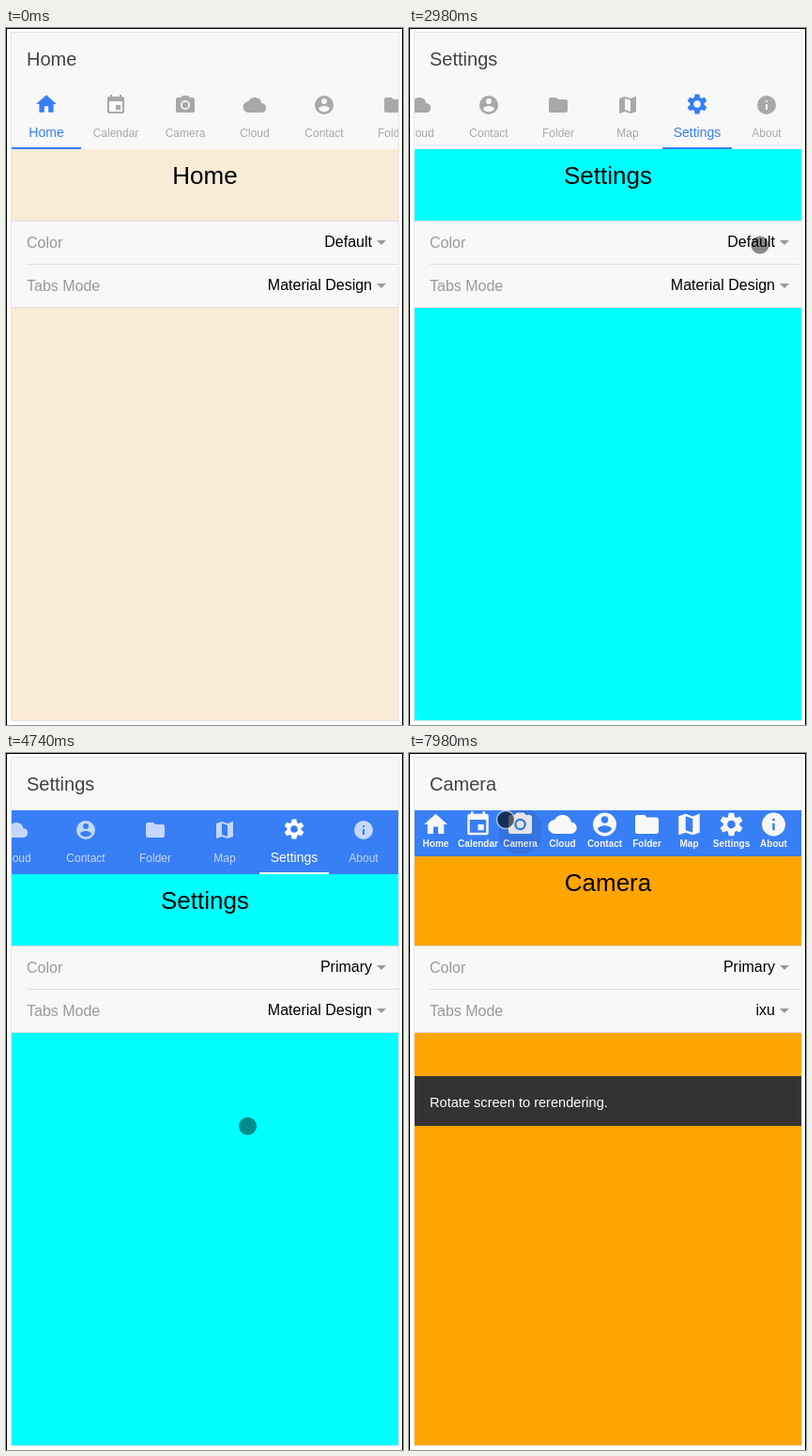
Write an HTML page with a canvas that moves like this. It is 423 px wide and 742 px high and loops after 8 s.

```html
<!DOCTYPE html>
<html lang="en">
<head>
<meta charset="utf-8">
<title>Tabs demo</title>
<style>
  html, body { margin: 0; width: 100%; height: 100%; overflow: hidden; background: #fff; }
  canvas { display: block; }
</style>
</head>
<body>
<canvas id="stage" width="423" height="742"></canvas>
<script>
const ctx = document.getElementById('stage').getContext('2d');
const LOOP = 8000, BLUE = '#387ef5', PAPER = '#f8f8f8', LINE = '#dedede';
const LEFT = 6, TOP = 5, WIDTH = 412, BOTTOM = 737, TAB = 74, COMPACT_TAB = 45;

// Icons on a 24 unit grid, filled even-odd
const disc = (x, y, r) =>
  `M${x - r} ${y}a${r} ${r} 0 1 0 ${2 * r} 0a${r} ${r} 0 1 0 ${-2 * r} 0z`;
const gear = () => {
  const points = [];
  for (let tooth = 0; tooth < 6; tooth++)
    for (const [offset, r] of [[-24, 7], [-13, 10], [13, 10], [24, 7]]) {
      const a = (tooth * 60 - 90 + offset) * Math.PI / 180;
      points.push(`${12 + r * Math.cos(a)} ${12 + r * Math.sin(a)}`);
    }
  return `M${points.join('L')}z` + disc(12, 12, 3.5);
};

const tabs = [
  ['Home', '#faebd7', 'M10 20v-6h4v6h5v-8h3L12 3 2 12h3v8z'],
  ['Calendar', '#7fffd4', 'M5 3h1V1h2v2h8V1h2v2h1a2 2 0 0 1 2 2v14a2 2 0 0 1-2 2H5a2 2 0 0 1-2-2V5a2 2 0 0 1 2-2zM5 8v11h14V8zM12 12h5v5h-5z'],
  ['Camera', '#ffa500', 'M9 2L7 4H4a2 2 0 0 0-2 2v12a2 2 0 0 0 2 2h16a2 2 0 0 0 2-2V6a2 2 0 0 0-2-2h-3L15 2z' + disc(12, 12, 5) + disc(12, 12, 3.2)],
  ['Cloud', '#87ceeb', 'M19.4 10A7.5 7.5 0 0 0 5.4 8 6 6 0 0 0 6 20h13a5 5 0 0 0 .4-10z'],
  ['Contact', '#9acd32', disc(12, 12, 10) + disc(12, 8, 3) + 'M12 19.2a7.2 7.2 0 0 1-6-3.2c0-2 4-3.1 6-3.1s6 1.1 6 3.1a7.2 7.2 0 0 1-6 3.2z'],
  ['Folder', '#808080', 'M10 4H4a2 2 0 0 0-2 2v12a2 2 0 0 0 2 2h16a2 2 0 0 0 2-2V8a2 2 0 0 0-2-2h-8z'],
  ['Map', '#008080', 'M20.5 3L15 5.1 9 3 3 5v16l6-2.1 6 2.1 6-2V3zM15 19l-6-2.1V5l6 2.1z'],
  ['Settings', '#00ffff', gear()],
  ['About', '#d3d3d3', disc(12, 12, 10) + 'M11 11h2v6h-2zM11 7h2v2h-2z']
].map(([name, color, path]) => ({ name, color, icon: new Path2D(path) }));

// [time, tab index]
const selections = [[-1000, 0], [160, 2], [740, 4], [1810, 6], [2400, 7], [5400, 5], [7640, 2]];
const COLOR_SET = 4300, MODE_SET = 7110;
const taps = [160, 740, 1810, 2400, 3160, 3640, 4290, 5400, 5840, 6520, 7090, 7920];

const dialogs = [
  { title: 'Color', top: 188, listHeight: 239, open: 3180, close: COLOR_SET, pick: 3650,
    options: ['Default', 'Primary', 'Secondary', 'Danger', 'Dark', 'Light'] },
  { title: 'Tabs Mode', top: 241, listHeight: 133, open: 5851, close: MODE_SET, pick: 6530,
    options: ['Material Design', 'ixu', 'Gardens Tablet'] }
];

// [time, x, y]
const pointer = [
  [100, 215, 170], [155, 192, 98], [620, 192, 98], [735, 340, 100], [1280, 340, 100],
  [1700, 347, 108], [2080, 347, 108], [2350, 306, 104], [2560, 306, 104], [2760, 345, 140],
  [2980, 374, 231], [3260, 374, 231], [3620, 150, 325], [3820, 150, 325], [4120, 279, 478],
  [4240, 300, 525], [4480, 300, 525], [5340, 160, 104], [5480, 160, 104], [5800, 308, 273],
  [5960, 308, 273], [6240, 210, 350], [6500, 125, 378], [6640, 125, 378], [6840, 307, 465],
  [6980, 305, 472], [7240, 305, 472], [7420, 242, 267], [7450, 232, 237], [7600, 103, 71]
];

const clamp = (v, lo = 0, hi = 1) => Math.min(hi, Math.max(lo, v));
const mix = (a, b, p) => a + (b - a) * p;
const easeOut = p => 1 - (1 - clamp(p)) ** 3;
const easeInOut = p => (p = clamp(p)) < .5 ? 2 * p * p : 1 - 2 * (1 - p) ** 2;
const scrollFor = index => clamp((index + .5) * TAB - WIDTH / 2, 0, tabs.length * TAB - WIDTH);

function rect(x, y, w, h, color) {
  ctx.fillStyle = color;
  ctx.fillRect(x, y, w, h);
}

function circle(x, y, r, fill, stroke, lineWidth = 2) {
  ctx.beginPath();
  ctx.arc(x, y, r, 0, 7);
  if (fill) { ctx.fillStyle = fill; ctx.fill(); }
  if (stroke) { ctx.strokeStyle = stroke; ctx.lineWidth = lineWidth; ctx.stroke(); }
}

function text(str, x, y, size, color, align = 'left', weight = 'normal') {
  ctx.font = `${weight} ${size}px "Liberation Sans", Arial, sans-serif`;
  ctx.textAlign = align;
  ctx.fillStyle = color;
  ctx.fillText(str, x, y);
}

function clipped(x, y, w, h, draw) {
  ctx.save();
  ctx.beginPath();
  ctx.rect(x, y, w, h);
  ctx.clip();
  draw();
  ctx.restore();
}

function drawIcon(icon, x, y, scale, color) {
  ctx.save();
  ctx.translate(x, y);
  ctx.scale(scale, scale);
  ctx.translate(-12, -12);
  ctx.fillStyle = color;
  ctx.fill(icon, 'evenodd');
  ctx.restore();
}

const lastTap = t => taps.filter(time => time <= t).pop() ?? -1000;

function ripple(x, y, age) {
  if (age < 200) circle(x, y, 4 + age * .34, `rgba(0,0,0,${.12 * (1 - age / 200)})`);
}

function drawWideTabs(t, current, previous, since, primary) {
  const scroll = mix(scrollFor(previous), scrollFor(current), easeOut(since / 150));
  const idle = primary ? 'rgba(255,255,255,.7)' : '#a8a8a8';
  const active = primary ? '#fff' : BLUE;
  clipped(LEFT, 61, WIDTH, 68, () => {
    tabs.forEach(({ name, icon }, i) => {
      const x = LEFT + (i + .5) * TAB - scroll, on = i === current;
      drawIcon(icon, x, on ? 81 : 82, on ? 1.08 : 1, on ? active : idle);
      text(name, x, 116, on ? 14 : 12, on ? active : idle, 'center');
    });
    const line = mix(previous, current, easeOut(since / 300)) * TAB;
    rect(LEFT + line - scroll, 127, TAB, 2, active);

    const tabX = LEFT + current * TAB - scroll;
    clipped(tabX, 61, TAB, 68, () => ripple(tabX + TAB / 2, 95, since));

    if (scrollFor(current) !== scrollFor(previous)) {
      const shade = `rgba(0,0,0,${.25 * clamp((550 - since) / 200)})`;
      rect(8 + scroll * .595, 121, 249, 6, shade);
      rect(410, 61, 6, 54, shade);
    }
  });
}

function drawCompactTabs(t, current) {
  tabs.forEach(({ name, icon }, i) => {
    const x = 28.5 + i * COMPACT_TAB;
    drawIcon(icon, x, 76, 1.25, PAPER);
    text(name, x, 100, 10, PAPER, 'center', 'bold');
  });
  const x = LEFT + current * COMPACT_TAB;
  if (t >= 7920) clipped(x, 61, COMPACT_TAB, 49, () => ripple(x + COMPACT_TAB / 2, 83, t - 7920));
}

function drawRow(label, value, y) {
  text(label, 22, y + 6, 16, '#999');
  text(value, 390, y + 5, 16, '#000', 'right');
  ctx.fillStyle = '#999';
  ctx.fill(new Path2D(`M395 ${y - 2}h10l-5 5z`));
}

function drawPage(t) {
  const at = selections.findLastIndex(([time]) => time <= t);
  const [time, current] = selections[at];
  const before = selections[Math.max(0, at - 1)][1];
  const page = tabs[current];
  const primary = t >= COLOR_SET, compact = t >= MODE_SET;
  const barBottom = compact ? 110 : 129;

  rect(LEFT, TOP, WIDTH, BOTTOM - TOP, page.color);
  rect(LEFT, TOP, WIDTH, barBottom - TOP, PAPER);
  if (primary) rect(LEFT, 61, WIDTH, barBottom - 61, BLUE);
  text(page.name, 22, 40, 20, '#424242');
  if (compact) drawCompactTabs(t, current);
  else drawWideTabs(t, current, before, t - time, primary);

  text(page.name, 212, barBottom + 37, 26, '#000', 'center');
  rect(LEFT, 205, WIDTH, 93, LINE);
  rect(LEFT, 206, WIDTH, 91, PAPER);
  rect(22, 251, 396, 1, LINE);
  drawRow('Color', primary ? 'Primary' : 'Default', 228);
  drawRow('Tabs Mode', compact ? 'ixu' : 'Material Design', 274);

  if (compact) {
    ctx.save();
    ctx.globalAlpha = clamp((t - 7300) / 200);
    rect(LEFT, 344, WIDTH, 53, '#333');
    text('Rotate screen to rerendering.', 22, 377, 14.6, '#fff');
    ctx.restore();
  }
}

function drawDialog(t, { title, top, listHeight, open, close, pick, options }) {
  if (t < open || t > close + 200) return;
  const entering = easeInOut((t - open) / 200), leaving = easeInOut((t - close) / 200);
  const alpha = entering * (1 - leaving), scale = 1.1 - .1 * entering - .1 * leaving;
  const listTop = top + 70, listBottom = listTop + listHeight, bottom = listBottom + 57;
  const selected = t >= pick ? 1 : 0;

  rect(LEFT, TOP, WIDTH, BOTTOM - TOP, `rgba(0,0,0,${alpha * .5})`);
  ctx.save();
  ctx.globalAlpha = alpha;
  ctx.translate(212, 371);
  ctx.scale(scale, scale);
  ctx.translate(-212, -371);

  ctx.save();
  ctx.shadowColor = 'rgba(0,0,0,.45)';
  ctx.shadowBlur = 20;
  ctx.shadowOffsetY = 14;
  ctx.fillStyle = '#fafafa';
  ctx.beginPath();
  ctx.roundRect(87, top, 250, bottom - top, 2);
  ctx.fill();
  ctx.restore();

  text(title, 111, top + 44, 22, '#000');
  clipped(87, listTop, 250, listHeight, () => options.forEach((option, i) => {
    const y = top + 93 + i * 44, on = i === selected;
    circle(108, y, 7, null, on ? BLUE : '#757575');
    if (on) circle(108, y, 4.2, BLUE);
    text(option, 129, y + 5, 14, on ? BLUE : '#222');
  }));
  rect(87, listTop, 250, 1, LINE);
  rect(87, listBottom, 250, 1, LINE);
  text('CANCEL', 207, listBottom + 34, 14, BLUE);
  text('OK', 291, listBottom + 34, 14, BLUE);
  ctx.restore();
}

function drawPointer(t) {
  if (t < pointer[0][0]) return;
  const at = pointer.findLastIndex(([time]) => time <= t);
  const [t0, x0, y0] = pointer[at], [t1, x1, y1] = pointer[at + 1] ?? [LOOP, x0, y0];
  const p = (t - t0) / (t1 - t0), x = mix(x0, x1, p), y = mix(y0, y1, p);
  const age = t - lastTap(t);
  if (y > 129) ripple(x, y, age);
  if (age < 100) circle(x, y, 9.5, 'rgba(0,0,0,.6)', 'rgba(255,255,255,.6)', 1.5);
  else circle(x, y, 9.5, 'rgba(0,0,0,.45)');
}

function frame(now) {
  const t = now % LOOP;
  rect(0, 0, 423, 742, '#fff');
  rect(0, 0, 423, 1, '#000');
  rect(0, 0, 1, 742, '#000');
  rect(422, 0, 1, 742, '#000');
  rect(LEFT - 1, TOP - 1, WIDTH + 2, BOTTOM - TOP + 2, '#e4e4e4');
  drawPage(t);
  dialogs.forEach(dialog => drawDialog(t, dialog));
  drawPointer(t);
}

const start = performance.now();
(function tick() {
  frame(performance.now() - start);
  requestAnimationFrame(tick);
})();
</script>
</body>
</html>
```
